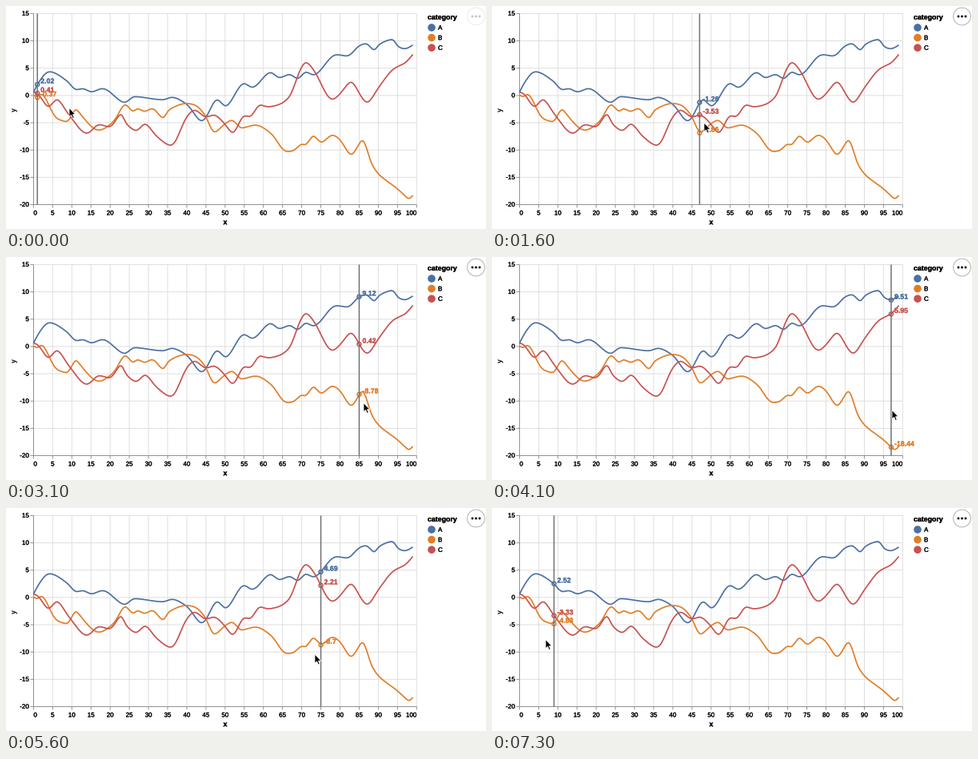
Recreate the animation shown at these times as a matplotlib script. Size 600x279 px, loop 7400 ms.

```python
import numpy as np
import matplotlib.pyplot as plt
from matplotlib.animation import FuncAnimation
from matplotlib.patches import Circle, Polygon
from matplotlib.patheffects import withStroke

W, H, DPI = 600, 279, 100
FRAMES, STEP = 74, 100
PT = 72 / DPI
LEFT, RIGHT, TOP, BOTTOM = 34.4, 513.3, 9.5, 248.5
GRID, AXIS = "#dcdcdc", "#888888"

plt.rcParams["font.family"] = "Liberation Sans"
plt.rcParams["text.hinting"] = "none"

# Turning points (x, y) of each walk
A = [(0, .62), (1, 2.02), (4, 4.4), (9, 2.52), (11, 1), (13, 1.3), (15, .6),
     (18, 1.3), (24, -1.35), (26, -.2), (34, -.8), (36, -.3), (40, -1.6),
     (44, -4.78), (48, -.61), (50, -2.07), (55, 2.3), (57, 1.4), (62, 4.3),
     (64, 3.2), (67, 3.9), (69, 2.95), (71, 4.4), (73, 3.7), (79, 7.5),
     (82, 7.2), (85, 9.12), (87, 9.55), (89, 8.1), (90, 9.27), (94, 10.3),
     (95, 9), (97, 8.51), (99, 9.24)]
B = [(0, .1), (1, -.37), (2, .4), (6, -4.2), (9, -4.83), (11, -2.3),
     (12.5, -3.7), (17, -6.4), (21, -4.7), (24, -1.5), (26, -3.1), (27, -2.3),
     (29, -3), (31, -2.3), (34, -4.3), (35, -2.8), (40, -1.45), (42, -1.7),
     (45, -3.8), (47, -6.86), (50, -5.16), (52, -4.45), (54, -6), (58, -5.4),
     (62, -6.95), (66, -10.3), (68, -10.1), (70, -8.8), (71, -9.2),
     (73, -7.2), (75, -8.7), (78, -7.2), (80, -8.1), (83, -11), (85, -8.78),
     (86, -7.9), (88, -12.2), (90, -14.37), (95, -17.1), (97, -18.44),
     (98, -19.1), (99, -18.3)]
C = [(0, .63), (1, .41), (4, -2.2), (6, -.6), (9, -3.33), (14, -7),
     (17, -5.3), (20, -5.8), (23, -3.2), (24, -5), (27, -6.5), (29, -5.1),
     (32, -7.4), (36, -9.2), (40, -3.9), (42, -2.6), (45, -4), (47, -3.53),
     (50, -5.26), (52, -7), (55, -3.6), (56.5, -4), (59, -1.65), (61, -2.1),
     (64, -1.7), (67, -.1), (69, 3.7), (71, 6.2), (73, 4.8), (78, -.8),
     (80, .3), (83, 2.6), (85, .42), (87, -1.4), (90, 1.4), (94, 4.9),
     (97, 5.95), (99, 7.52)]

# Time in ms, hovered x value, pointer x, pointer y
PATH = [(0, 1, 79, 127.5), (100, 11, 91, 128.5), (1600, 47, 265, 146),
        (3100, 85, 447, 182.5), (4100, 97, 500, 191.5), (5000, 90, 459, 188),
        (6300, 50, 264, 175.5), (7300, 9, 67, 164.5)]


def sx(v):
    return LEFT + np.asarray(v) * (RIGHT - LEFT) / 100


def sy(v):
    return TOP + (15 - np.asarray(v)) * (BOTTOM - TOP) / 35


def glide(xs, ys, t):
    """Monotone cubic interpolation through the key points."""
    x, y = np.asarray(xs, float), np.asarray(ys, float)
    h = np.diff(x)
    d = np.diff(y) / h
    m = np.concatenate([d[:1], np.zeros(len(x) - 2), d[-1:]])
    for i in range(1, len(x) - 1):
        if d[i - 1] * d[i] > 0:
            m[i] = 2 * d[i - 1] * d[i] / (d[i - 1] + d[i])
    k = np.clip(np.searchsorted(x, t, side="right") - 1, 0, len(h) - 1)
    u = (t - x[k]) / h[k]
    return (y[k] * (1 + 2 * u) * (1 - u) ** 2 + m[k] * h[k] * u * (1 - u) ** 2
            + y[k + 1] * u**2 * (3 - 2 * u) + m[k + 1] * h[k] * u**2 * (u - 1))


def basis(values, n=8):
    """Uniform cubic B-spline with clamped ends."""
    p = np.pad(np.asarray(values, float), 2, mode="edge")
    t = np.linspace(0, 1, n, endpoint=False)
    w = np.stack([(1 - t) ** 3, 3 * t**3 - 6 * t**2 + 4,
                  -3 * t**3 + 3 * t**2 + 3 * t + 1, t**3]) / 6
    quads = np.stack([p[i:len(p) - 3 + i] for i in range(4)], axis=1)
    return np.append((quads @ w).ravel(), p[-1])


fig = plt.figure(figsize=(W / DPI, H / DPI), dpi=DPI, facecolor="white")
ax = fig.add_axes([0, 0, 1, 1])
ax.set_xlim(0, W)
ax.set_ylim(H, 0)
ax.axis("off")


def line(xs, ys, color, width, z):
    return ax.plot(xs, ys, color=color, lw=width * PT, zorder=z, snap=False,
                   solid_capstyle="butt", solid_joinstyle="round")[0]


def label(x, y, s, size=8, ha="left", color="black", weight="normal", z=8):
    text = ax.text(x, y + 0.3 * size, s, fontsize=size * PT, ha=ha,
                   va="baseline", color=color, weight=weight, zorder=z)
    text.set_path_effects([withStroke(linewidth=0.25 * PT, foreground=color)])
    return text


def disc(x, y, r, fill, edge="none", width=0, z=5):
    return ax.add_patch(Circle((x, y), r, facecolor=fill, edgecolor=edge,
                               lw=width * PT, zorder=z))


# Grid, ticks and axis labels
for v in range(0, 101, 5):
    x = sx(v)
    line([x, x], [TOP, BOTTOM], GRID, 0.9, 1)
    line([x, x], [BOTTOM, BOTTOM + 4], AXIS, 0.9, 2)
    ha = {0: "left", 100: "right"}.get(v, "center")
    label(x, 259, str(v), ha=ha)
for v in range(-20, 16, 5):
    y = sy(v)
    line([LEFT, RIGHT], [y, y], GRID, 0.9, 1)
    line([LEFT - 4, LEFT], [y, y], AXIS, 0.9, 2)
    label(28.8, y, str(v), ha="right")
line([LEFT, LEFT], [TOP, BOTTOM], AXIS, 0.9, 2)
line([LEFT, RIGHT], [BOTTOM, BOTTOM], AXIS, 0.9, 2)
label(274, 270.6, "x", 8.8, "center", weight="bold")
ax.text(11, 130, "y", fontsize=8.8 * PT, weight="bold", rotation=90,
        ha="center", va="center")

# Legend and curves
label(527, 14.2, "category", 8.8, weight="bold")
days = np.arange(100)
series = []
for row, (name, points, color) in enumerate([("A", A, "#4b70a3"),
                                             ("B", B, "#e07e28"),
                                             ("C", C, "#c75250")]):
    data = glide(*zip(*points), days)
    series.append((data, color))
    y = 27 + 12.6 * row
    disc(532, y, 4.8, color)
    label(540, y + 0.3, name)
    line(sx(basis(days)), sy(basis(data)), color, 1.7, 3)

# Menu button
menu = [disc(587.5, 13, 10.9, "white", "#aaaaaa", 0.9, 6)]
menu += [disc(587.5 + dx, 13, 1.5, "#1b1e23", z=7) for dx in (-4.5, 0, 4.5)]

# Hover marks
rings = [disc(0, 0, 2.5, "none", color, 1.5, 4) for _, color in series]
rule = line([0, 0], [TOP, BOTTOM], "#707070", 1.5, 5)
tips = [label(0, 0, "", 8.8, color=color, weight="bold")
        for _, color in series]
ARROW = np.array([(0, 0), (0, 11.2), (2.6, 8.9), (4.4, 13), (6.2, 12.2),
                  (4.5, 8.2), (8, 8.2)])
cursor = ax.add_patch(Polygon(ARROW, facecolor="black", edgecolor="white",
                              lw=0.8 * PT, zorder=10))
times, *tracks = zip(*PATH)


def update(i):
    t = i * STEP
    hover, px, py = (glide(times, track, t) for track in tracks)
    k = int(round(hover))
    x = float(sx(k))
    rule.set_xdata([x, x])
    for (data, _), ring, tip in zip(series, rings, tips):
        y = float(sy(data[k]))
        ring.center = (x, y)
        tip.set_position((x + 4, y - 4 + 0.3 * 8.8))
        tip.set_text(f"{round(data[k], 2):g}")
    cursor.set_xy(ARROW + (px, py))
    fade = 0.25 + 0.75 * min(t / 500, 1) ** 1.7
    for part in menu:
        part.set_alpha(fade)
    return [rule, cursor, *rings, *tips, *menu]


anim = FuncAnimation(fig, update, frames=FRAMES, interval=STEP,
                     init_func=lambda: update(0), repeat=True,
                     repeat_delay=0, blit=False)
plt.show()
```
